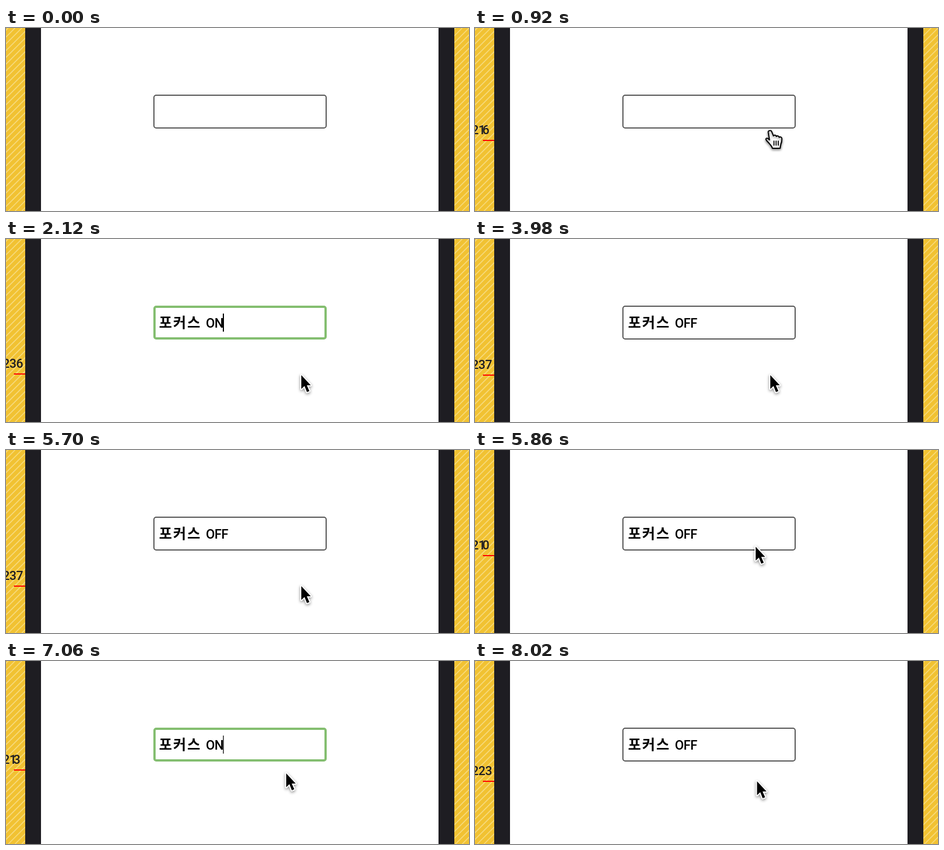
An HTML page with a canvas that plays this animation: 820 by 324 pixels, repeating every 8.18 s.

```html
<!DOCTYPE html>
<html lang="ko">
<head>
<meta charset="utf-8">
<style>
html, body { margin: 0; width: 100%; height: 100%; overflow: hidden; background: #fff; }
canvas { display: block; }
</style>
</head>
<body>
<canvas id="stage" width="820" height="324"></canvas>
<script>
const c = document.getElementById('stage').getContext('2d');
const LOOP = 8180, ENTER = 860, PRESS = 160;

// Each press toggles the focus of the field
const presses = [1620, 3800, 6440, 7500];
const moves = [
  { start: 726, time: 285, x: 523, y: 140 },
  { start: 1940, time: 170, x: 523, y: 241 },
  { start: 5766, time: 119, x: 494, y: 163 },
  { start: 5900, time: 400, x: 488, y: 163 },
  { start: 6840, time: 340, x: 499.5, y: 213 }
];

const clamp = v => Math.max(0, Math.min(1, v));
const ease = p => p * p * (3 - 2 * p);

function position(t) {
  let x = 523, y = 318;
  for (const m of moves) {
    const p = ease(clamp((t - m.start) / m.time));
    x += (m.x - x) * p;
    y += (m.y - y) * p;
  }
  return { x, y };
}

function rect(color, x, y, w, h) {
  c.fillStyle = color;
  c.fillRect(x, y, w, h);
}

function text(s, x, y, font, spacing = '0px') {
  c.font = font;
  c.letterSpacing = spacing;
  c.fillText(s, x, y);
}

function stroke(shape, color, width) {
  c.strokeStyle = color;
  c.lineWidth = width;
  c.stroke(shape);
}

function shadow(blur) {
  c.shadowColor = 'rgba(0,0,0,.45)';
  c.shadowBlur = blur;
  c.shadowOffsetY = blur ? 2 : 0;
}

const stripes = new Path2D();
for (let x = 4; x < 1160; x += 12) {
  stripes.moveTo(x, 0);
  stripes.lineTo(x - 324, 324);
}
const arrow = new Path2D('M0 0V24.5L5.7 19.2L10 30L14.3 28.2L9.8 18H16.8Z');
const hand = new Path2D('M-3.6 2.5C-4.4-.6 1.2-1.6 2.4 1.4L5.6 9C6.5 6.8 10.3 7.4 10.7 10' +
  'C12 8.2 15.4 9 15.7 11.6C17.4 10 20.5 11.2 20.5 14C20.6 18 20.2 20.6 18.6 24L17.4 31H3.8' +
  'C2.8 27-.4 24-3.6 20.5C-5.6 18.2-8.2 16.3-7.8 14.4C-7.3 12.5-4 12.6-1.5 16Z');
const fingers = new Path2D('M6.5 18V25.5M10.3 18V25.5M14.1 18V25.5');
const beam = new Path2D('M-7-15C-3-15 0-14 0-11C0-14 3-15 7-15M0-11V11M-7 15C-3 15 0 14 0 11C0 14 3 15 7 15M-3 1H3');
const ring = new Path2D();
ring.arc(-0.5, 0, 33, 0, 7);

function background() {
  rect('#f1c232', 0, 0, 820, 324);
  stroke(stripes, '#f7da7c', 1.6);
  rect('#1e1d22', 34, 0, 28, 324);
  rect('#1e1d22', 766, 0, 28, 324);
  rect('#fff', 62, 0, 704, 324);
}

function field(t) {
  const past = presses.filter(p => p <= t);
  const on = past.length % 2 === 1;
  const w = on ? 4 : 2;
  const box = new Path2D();
  box.roundRect(261 + w / 2, 118 + w / 2, 307 - w, 60 - w, on ? 3 : 4);
  stroke(box, on ? '#84be70' : '#555', w);
  if (!past.length) return;
  c.fillStyle = '#000';
  text('포커스', 271, 157, '700 25px "Noto Sans CJK KR", "Noto Sans CJK", sans-serif', '2px');
  text(on ? 'ON' : 'OFF', 354, 157, '500 23px Roboto, sans-serif', '-0.7px');
  if (on) {
    // The caret fades out and back once a second
    const phase = (t - past.at(-1)) % 1000;
    c.globalAlpha = clamp((Math.abs(phase - 800) - 100) / 120);
    rect('#000', 384, 132, 2, 32);
    c.globalAlpha = 1;
  }
}

// The ruler reading trails the pointer slightly
function ruler(t) {
  const value = Math.floor((position(t - 20).y + 233) / 2);
  const y = 2 * value - 234;
  rect('#f00', 14, y, 20, 2);
  c.fillStyle = '#1e1d22';
  let x = -6;
  for (const d of String(value)) {
    text(d, x, y - 10, '500 22px Roboto, sans-serif');
    x += d === '1' ? 7 : 12;
  }
}

function pointer(t) {
  const { x, y } = position(t);
  c.save();
  c.translate(x, y);
  c.lineJoin = c.lineCap = 'round';
  if (t < ENTER + 80) {
    shadow(4);
    c.fillStyle = '#fff';
    c.fill(hand);
    stroke(hand, '#000', 2);
    shadow(0);
    stroke(fingers, '#000', 1.8);
  } else if (y < 170) {
    c.translate(0, 2);
    stroke(beam, '#fff', 5);
    stroke(beam, '#000', 2);
  } else {
    shadow(5);
    stroke(arrow, '#fff', 4);
    shadow(0);
    c.fillStyle = '#000';
    c.fill(arrow);
    c.translate(7, 13);
  }
  const press = presses.find(p => t >= p && t < p + PRESS);
  if (press) {
    c.globalAlpha = clamp(2 * (press + PRESS - t) / PRESS);
    stroke(ring, '#fff', 6);
    stroke(ring, '#000', 3);
  }
  c.restore();
}

function draw(now) {
  const t = now % LOOP;
  background();
  field(t);
  if (t >= ENTER) {
    ruler(t);
    pointer(t);
  }
  requestAnimationFrame(draw);
}
requestAnimationFrame(draw);
</script>
</body>
</html>
```
